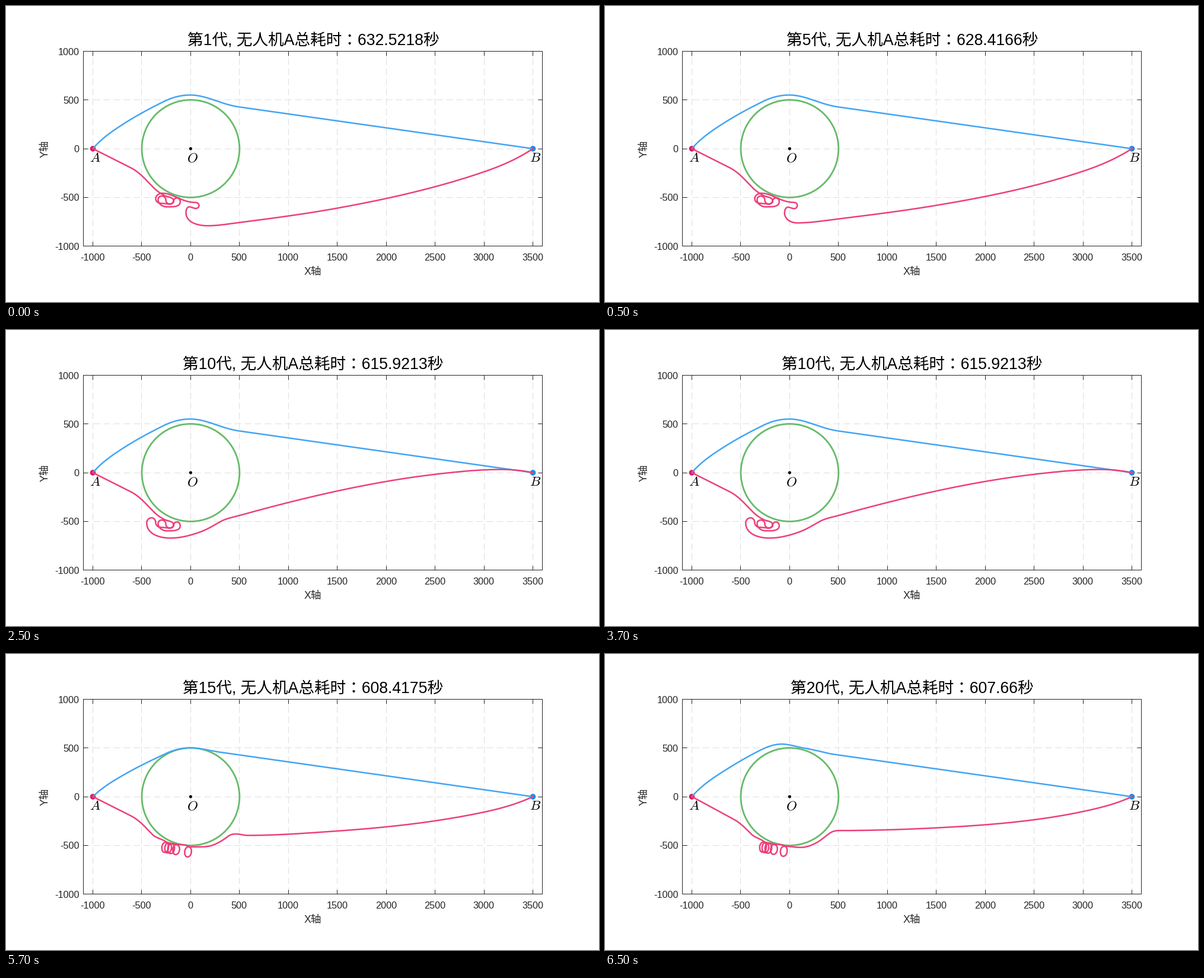
Animation of 1000x500 px, one loop 8 s. Source, as a matplotlib script:

```python
import numpy as np
import matplotlib.pyplot as plt
from matplotlib.animation import FuncAnimation
from matplotlib.patches import Circle

W, H, DPI = 1000, 500, 100
PX = 72 / DPI
INK, BLUE, PINK, GREEN = "#262626", "#42A5F5", "#EC407A", "#66BB6A"
LEFT, RIGHT, TOP, BOTTOM = 130.5, 904.5, 76.5, 405.5
X0, Y0 = 311.4, 241
XSTEP, YSTEP = 82.45, 82.25        # pixels per 500 units
A, B = (146.5, 241), (888.5, 241)

plt.rcParams["font.family"] = ["Liberation Sans", "Noto Sans CJK JP"]
plt.rcParams["mathtext.fontset"] = "cm"
plt.rcParams["lines.scale_dashes"] = False


def fly(poses, n=24):
    """Path through (x, y, heading) poses; equal turns come out as arcs."""
    u = np.linspace(0, 1, n)[:, None]
    parts = []
    for (xa, ya, ha), (xb, yb, hb) in zip(poses, poses[1:]):
        a, b = np.array([xa, ya]), np.array([xb, yb])
        turn = np.radians((hb - ha + 180) % 360 - 180)
        pull = np.hypot(*(b - a)) / np.cos(turn / 4) ** 2
        ta, tb = (pull * np.array([np.cos(h), -np.sin(h)])
                  for h in np.radians([ha, hb]))
        parts.append((2*u**3 - 3*u**2 + 1) * a + (u**3 - 2*u**2 + u) * ta
                     + (3*u**2 - 2*u**3) * b + (u**3 - u**2) * tb)
    return np.vstack(parts)


def curls(centers):
    """Small clockwise loops hanging below the gently falling path."""
    poses = []
    for x in centers:
        y = 318 + 0.2 * (x - 268)
        poses += [(x + 5.7, y + 7, -90), (x - 1, y + 17, 180),
                  (x - 5.7, y + 9, 90), (x + 1, y, 0)]
    return poses


# Upper routes: over the circle, then straight to B
GLIDE = -8.1
EXIT = [(393, 170.5, GLIDE), (*B, GLIDE)]
WIDE = fly([(*A, 50), (200, 198, 32.5), (268, 160.5, 26), (311, 150.4, 0),
            (357, 161, -19)] + EXIT)
TIGHT = fly([(*A, 45), (205, 200.5, 29.5), (270, 168, 25), (311, 158.6, 0),
             (360, 165.7, GLIDE), (*B, GLIDE)])
WAVY = fly([(*A, 50), (200, 198, 32.5), (265, 161, 26), (298, 152.2, 0),
            (333, 158.4, -10), (375, 167.4, -14)] + EXIT)

# Lower routes: dive, waste time in tight turns, then climb to B
DIVE = [(*A, -26.7), (210, 273, -26.7), (247, 305, -46)]
STEEP = [(*A, -28), (216, 278.5, -28), (247, 304.5, -45)]
KNOT = [(268, 320.5, -25), (282.5, 329, -90), (276, 334.5, 180),
        (269.5, 327.5, 90), (262.5, 321, 180), (256.5, 327, -90),
        (272, 339.3, 0), (293.8, 330.5, 90), (288.5, 324.3, 180),
        (283, 329, -90), (276, 334.5, 180), (261, 333.3, 180),
        (252.5, 325.5, 90)]
RIM = [(264, 316.3, 0), (296, 326.8, -22)]

GEN1 = fly(DIVE + KNOT + RIM + [
    (319, 331.8, 0), (325.5, 337, -90), (320, 342, 180), (309.5, 339.3, 180),
    (303.5, 349, -90), (340, 371.2, 0), (393, 365.8, 7.3),
    (558.5, 341.5, 10.3), (806.5, 280, 19), (*B, 34)])
GEN5 = fly(DIVE + KNOT + RIM + [
    (319, 331.8, 0), (324.3, 336.8, -90), (319, 342.3, 180),
    (309, 339.8, 180), (302.8, 349.5, -90), (324, 366.4, 0),
    (393, 359.7, 7), (558.5, 336.8, 9.5), (806.5, 279, 18.5), (*B, 33)])
GEN10 = fly(DIVE + KNOT + [
    (245.5, 317.3, 180), (237.3, 326, -90), (277, 351.5, 0), (328, 341, 20),
    (362, 323.5, 29), (393, 313.5, 15.5), (558.5, 272, 12.2),
    (723.5, 243.8, 6.7), (835, 235.6, 0), (*B, -12)])
GEN15 = fly(DIVE + curls([268.5, 273.5, 278.5, 287, 307]) + [
    (335, 325.6, 2), (362, 316.5, 30), (374, 308.3, 38), (386, 304, 2),
    (408, 306.4, 0), (558.5, 299, 4), (806.5, 267, 12), (*B, 25)])
GEN20 = fly(STEEP + curls([266.5, 270.5, 275.5, 285, 301.5]) + [
    (330, 326.7, 0), (358, 318, 30), (378, 303.3, 36), (391, 298.4, 4),
    (412, 298.2, 0.5), (558.5, 293.7, 3), (806.5, 266, 12), (*B, 25)])

# First tick of the half-second clock, generation, total time, routes
STAGES = [(0, 1, "632.5218", WIDE, GEN1),
          (1, 5, "628.4166", WIDE, GEN5),
          (5, 10, "615.9213", WIDE, GEN10),
          (9, 15, "608.4175", TIGHT, GEN15),
          (13, 20, "607.66", WAVY, GEN20)]

fig = plt.figure(figsize=(W / DPI, H / DPI), dpi=DPI, facecolor="white")
ax = fig.add_axes([0, 0, 1, 1])
ax.set_xlim(0, W)
ax.set_ylim(H, 0)
ax.axis("off")


def line(xs, ys, color=INK, width=1.0, **kw):
    return ax.plot(xs, ys, color=color, lw=width * PX, **kw)[0]


def rule(xs, ys, **kw):
    # Snapping moves a one-pixel line half a pixel on, so start half back
    line(np.array(xs) - 0.5, np.array(ys) - 0.5, snap=True,
         solid_capstyle="butt", dash_capstyle="butt", **kw)


def label(x, y, text, size, color=INK, **kw):
    kw = {"ha": "center", "va": "baseline", **kw}
    return ax.text(x, y, text, fontsize=size * PX, color=color, zorder=6, **kw)


def dot(x, y, r, color):
    ax.add_patch(Circle((x, y), r, fc=color, ec="none", zorder=3))


grid = dict(color="#DEDEDE", ls=(0, (11 * PX, 6 * PX)), zorder=1)
TICK = 7.5
for k in range(-2, 8):
    x = X0 + k * XSTEP
    rule([x, x], [BOTTOM, TOP], **grid)
    rule([x, x], [BOTTOM, BOTTOM - TICK])
    rule([x, x], [TOP, TOP + TICK])
    label(x - 0.5, 430, str(500 * k), 16.3)
for k in range(-2, 3):
    y = Y0 - k * YSTEP
    if abs(k) < 2:
        rule([LEFT, RIGHT], [y, y], **grid)
        rule([LEFT, LEFT + TICK], [y, y])
        rule([RIGHT, RIGHT - TICK], [y, y])
    label(123.5, y + 6.2, str(500 * k), 16.3, ha="right")
rule([LEFT, RIGHT, RIGHT, LEFT, LEFT], [TOP, TOP, BOTTOM, BOTTOM, TOP])

label(517.5, 454, "X轴", 17.6)
label(70.5, 241, "Y轴", 17.6, rotation=90, rotation_mode="anchor")

ax.add_patch(Circle((X0, Y0), 82.4, fill=False, ec=GREEN, lw=2.8 * PX, zorder=2))
dot(*A, 4.8, "#D81B60")
dot(*B, 4.8, "#1E88E5")
dot(X0, Y0, 2.6, "black")
for x, name in [(A[0] + 4, "A"), (X0 + 3, "O"), (B[0] + 4.5, "B")]:
    label(x, 263.3, f"${name}$", 22.8, "black")

upper = line([], [], BLUE, 2.5, zorder=4)
lower = line([], [], PINK, 2.5, zorder=5, solid_joinstyle="round")
title = label(518, 66.5, "", 26.67, "black")


def update(i):
    _, gen, total, up, low = [s for s in STAGES if s[0] <= i][-1]
    upper.set_data(*up.T)
    lower.set_data(*low.T)
    title.set_text(f"第{gen}代, 无人机A总耗时：{total}秒")
    return upper, lower, title


anim = FuncAnimation(fig, update, frames=16, interval=500, repeat=True,
                     repeat_delay=0)
plt.show()
```
